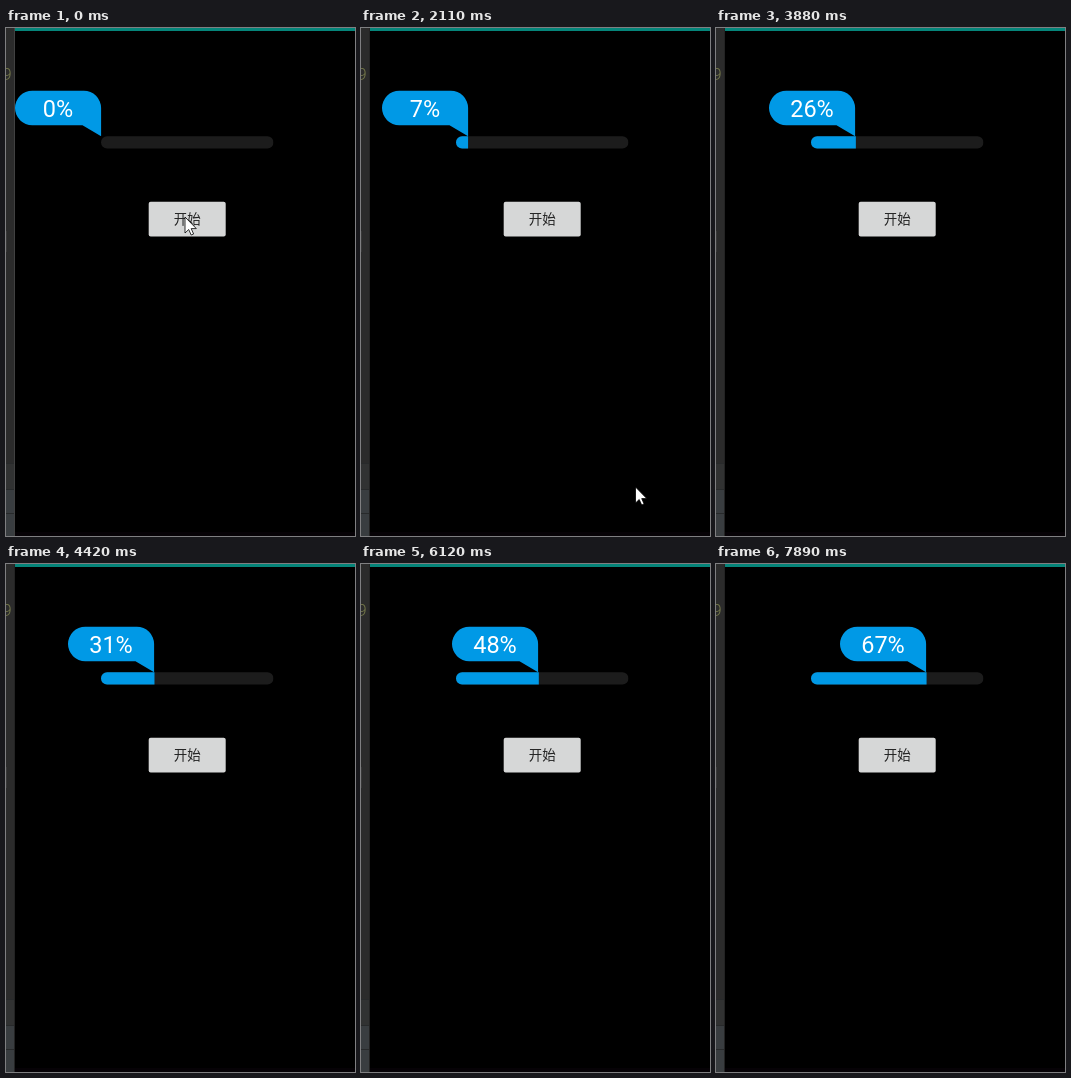
Recreate the animation shown at these times as an HTML page. Size 349 by 508 pixels, loop 8 s.

```html
<!DOCTYPE html>
<html lang="zh">
<head>
<meta charset="utf-8">
<style>
html, body { margin: 0; width: 100%; height: 100%; overflow: hidden; background: #000; }
svg { display: block; width: 349px; height: 508px; }
text { text-anchor: middle; }
</style>
</head>
<body>
<svg viewBox="0 0 349 508">
  <defs>
    <clipPath id="track"><rect x="95" y="108.3" width="172.5" height="12.2" rx="6.1"/></clipPath>
  </defs>

  <!-- editor edge behind the phone screen -->
  <rect width="9" height="508" fill="#2b2b2b"/>
  <rect y="203" width="1" height="21" fill="#383838"/>
  <text x="1" y="52" font-family="Roboto, sans-serif" font-size="17" font-weight="300" fill="#75794a">9</text>
  <rect y="435" width="9" height="26" fill="#313232"/>
  <rect y="461" width="9" height="47" fill="#393d40"/>
  <path d="M0 435.5h8M0 461.5h8M0 485.5h8" stroke="#282a2b"/>
  <rect id="edge" x="8" width="1" height="508"/>

  <rect x="9" width="340" height="508"/>
  <rect x="9" width="340" height="3" fill="#05857a"/>
  <rect x="9" y="504" width="340" height="4" fill="#060206"/>

  <g clip-path="url(#track)">
    <rect x="95" y="108" width="172.5" height="13" fill="#1c1c1c"/>
    <rect id="fill" x="95" y="108" width="0" height="13" fill="#0099e6"/>
  </g>
  <g id="bubble">
    <path d="M26.3 62.7H77.8A17.3 17.3 0 0 1 95.1 80V108.3L76.5 97.3H26.3A17.3 17.3 0 0 1 26.3 62.7Z" fill="#0099e6"/>
    <text id="label" x="52" y="89" font-family="Roboto, sans-serif" font-size="23.5" fill="#fff">0%</text>
  </g>

  <rect x="142.7" y="173.7" width="77" height="34.7" rx="2" fill="#d6d7d7"/>
  <text x="181.3" y="196" font-family="'Noto Sans CJK SC', 'Noto Sans CJK', sans-serif" font-size="13.5" fill="#222">开始</text>

  <path id="cursor" d="M0 0V16L3.7 12.5L6.2 18L8.6 17L6.2 11.6H11.3Z" fill="#fff" stroke="#000" stroke-width=".8"/>
</svg>
<script>
const LOOP = 8000, START = 1330, MS_PER_PERCENT = 97.8, PX_PER_PERCENT = 1.725;
const $ = id => document.getElementById(id);

// pointer path: time, x, y
const path = [
  { t: 900, x: 179, y: 189 },
  { t: 1210, x: 199.5, y: 279 },
  { t: 1490, x: 244, y: 390 },
  { t: 2110, x: 274.5, y: 459 },
  { t: 2700, x: 289, y: 468 },
  { t: 3190, x: 349, y: 520 }
];

function pointerAt(time) {
  const t = Math.min(Math.max(time, path[0].t), path.at(-1).t);
  const i = Math.max(1, path.findIndex(p => p.t >= t));
  const a = path[i - 1], b = path[i], f = (t - a.t) / (b.t - a.t);
  return [a.x + (b.x - a.x) * f, a.y + (b.y - a.y) * f];
}

function draw(now) {
  const t = now % LOOP;
  const percent = Math.max(0, Math.floor((t - START) / MS_PER_PERCENT));
  const width = percent * PX_PER_PERCENT;
  $('fill').setAttribute('width', width);
  $('bubble').setAttribute('transform', `translate(${Math.floor(width)})`);
  $('label').textContent = percent + '%';
  $('cursor').setAttribute('transform', `translate(${pointerAt(t)})`);
  $('edge').setAttribute('fill', t < 150 ? '#414141' : '#232323');
}

let start;
function loop(now) {
  start ??= now;
  draw(now - start);
  requestAnimationFrame(loop);
}
draw(0);
requestAnimationFrame(loop);
</script>
</body>
</html>
```
